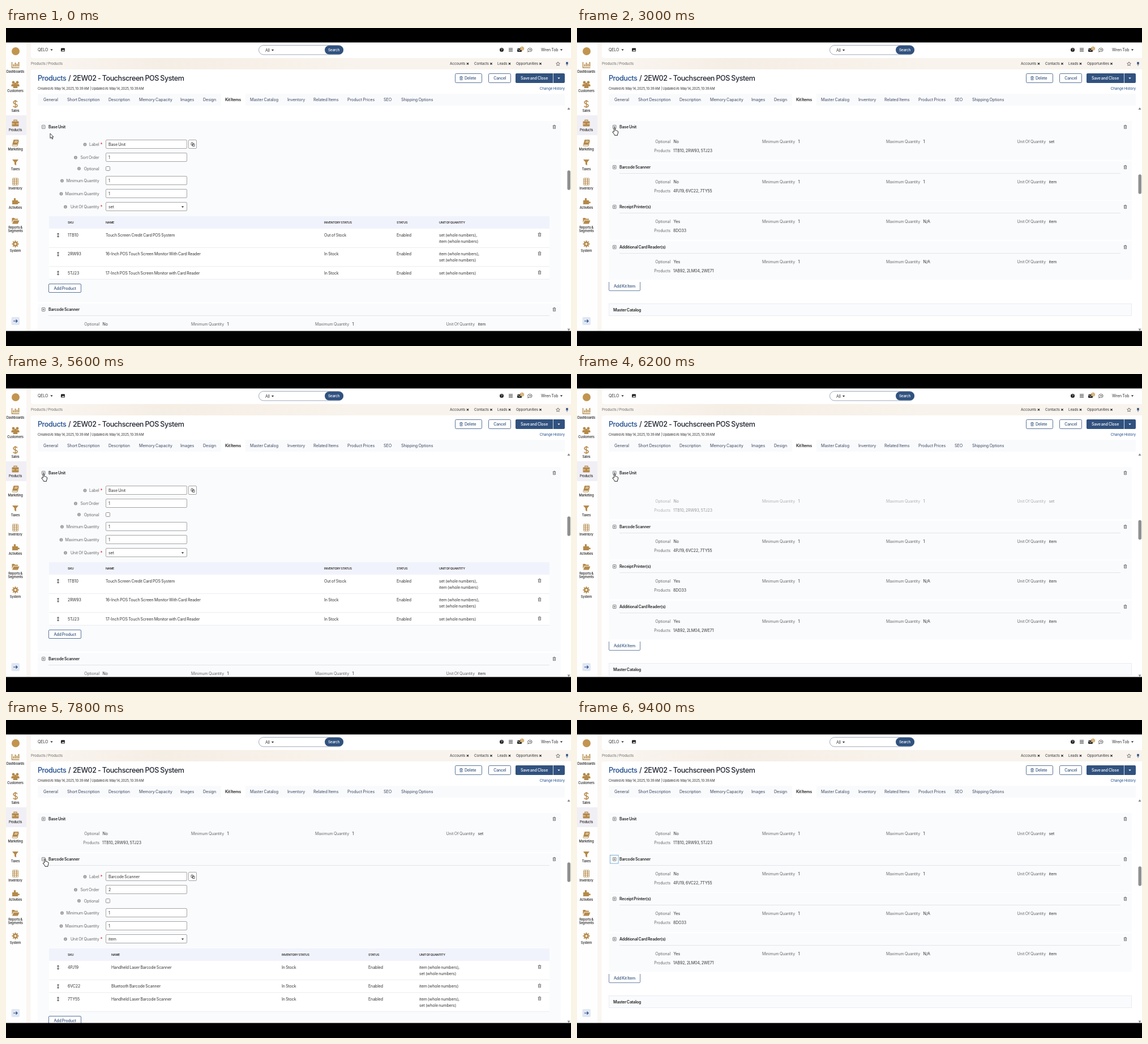
An HTML page for the animation above (9800 ms loop, 998x561 px).

```html
<!DOCTYPE html>
<html lang="en">
<head>
<meta charset="utf-8">
<title>Product kit items</title>
<style>
html, body { margin: 0; width: 100%; height: 100%; overflow: hidden; background: #000; }
svg { display: block; width: 100vw; height: 100vh; }
text { font: 400 7px Inter, sans-serif; letter-spacing: -.1px; word-spacing: -.5px; fill: #333; white-space: pre; }
.end { text-anchor: end; }
.mid { text-anchor: middle; }
.dim { fill: #6a6a6a; }
.bold { font-weight: 600; letter-spacing: -.18px; fill: #222; }
.title { font-size: 12.6px; font-weight: 500; letter-spacing: -.46px; fill: #1f2430; }
.tab { font-size: 7.2px; letter-spacing: -.08px; fill: #3c4660; }
.on { font-weight: 600; letter-spacing: -.25px; fill: #222; }
.small { font-size: 6.3px; }
.tiny { font-size: 5.9px; letter-spacing: -.18px; }
.link { fill: #1d4b8c; }
.side { font-size: 5.8px; font-weight: 500; letter-spacing: -.2px; text-anchor: middle; fill: #222; }
.th { font-size: 5.4px; font-weight: 600; letter-spacing: -.3px; fill: #333; }
.btn { font-weight: 500; letter-spacing: -.18px; fill: #34527d; }
.white { fill: #fff; }
.red { fill: #d22; font-size: 8px; }
</style>
</head>
<body>
<svg id="stage" viewBox="0 0 998 561" preserveAspectRatio="none"></svg>
<script>
const LOOP = 9800, STEP = 200;
const FORM_H = 300.8, SUMMARY_H = 49.7, HEAD_H = 21;
const NAVY = '#31527f', GOLD = '#b58a4a';

const text = (x, y, s, cls = '') => `<text x="${x}" y="${y}" dy=".36em" class="${cls}">${s}</text>`;
const rect = (x, y, w, h, fill, stroke = 'none', r = 0) =>
  `<rect x="${x}" y="${y}" width="${w}" height="${h}" rx="${r}" fill="${fill}" stroke="${stroke}" stroke-width=".8"/>`;
const path = (d, stroke = 'none', fill = 'none', w = .8) =>
  `<path d="${d}" stroke="${stroke}" fill="${fill}" stroke-width="${w}"/>`;
const dot = (x, y, r, fill) => `<circle cx="${x}" cy="${y}" r="${r}" fill="${fill}"/>`;
const caret = (x, y, c = '#222') => path(`M${x - 2.2} ${y - 1}h4.4l-2.2 2.4z`, 'none', c);
const cross = (x, y) => path(`M${x - 1.7} ${y - 1.7}l3.4 3.4m0-3.4l-3.4 3.4`, '#222', 'none', 1.1);
const trash = (x, y, c = '#555') =>
  path(`M${x - 2.8} ${y - 2}h5.6M${x - 1} ${y - 2.2}v-1h2v1M${x - 2} ${y - 2}v5h4v-5M${x - .6} ${y - .6}v2.4M${x + .6} ${y - .6}v2.4`, c, 'none', .7);
const at = (x, y, body) => `<g transform="translate(${x} ${y})">${body}</g>`;

function sidebar() {
  const icons = {
    Dashboards: [65, path('M-6-5v10h13', GOLD, 'none', 1.4) + path('M-3 3v-4M0 3v-7M3 3v-5M6 3v-8', GOLD, 'none', 1.8)],
    Customers: [99, dot(-3.5, -3, 2.4, GOLD) + dot(3.5, -3, 2.4, GOLD) + path('M-7 4v-3q3-3 6 0h2q3-3 6 0v3z', 'none', GOLD) + dot(0, 0, 2.4, GOLD) + path('M-4 7q0-5 4-5t4 5z', 'none', GOLD)],
    Sales: [134, path('M3.5-3.5q-1-2-3.5-2t-3.5 2.5q0 2 3.5 3t3.5 3q0 2.5-3.5 2.5t-3.5-2M0-7v14', GOLD, 'none', 1.5)],
    Products: [168, rect(-6, -3.5, 12, 9, GOLD, 'none', 1) + path('M-2.5-3.5v-2h5v2', GOLD, 'none', 1.3) + path('M-6 1h4.5M1.5 1h4.5', '#f1eff6', 'none', .9)],
    Marketing: [202, path('M-3-5h9l-2.5 9h-9z', 'none', GOLD) + path('M-5.5 4.5q-.5 1.5 1 1.5h8l2.5-9', GOLD, 'none', 1) + path('M-1-2.5h5M-1.6-.5h5', '#fff', 'none', .8)],
    Taxes: [237, path('M-5.5-5h11l-4 5v5.5l-3-2v-3.5z', 'none', GOLD)],
    Inventory: [271, rect(-5, -6, 10, 12, 'none', GOLD, .5) + path('M-5-3h10M-5 0h10M-5 3h10M-2-6v12M2-6v12', GOLD, 'none', 1.1)],
    Activities: [305, path('M-5.5-1h3q-1-4 1.5-4t1.5 4h4v2.5q3-1 3 1.2t-3 1.2v2h-10z', 'none', GOLD)],
    'Reports &amp;': [340, path('M-6-5h4l1.5 1.5h5v2h-8l-2.5 5z', 'none', GOLD) + path('M-3-.5h10l-2.5 6h-10z', 'none', GOLD)],
    System: [381, dot(0, 0, 4, GOLD) + path('M0-6v12M-6 0h12M-4.2-4.2l8.4 8.4M4.2-4.2l-8.4 8.4', GOLD, 'none', 2) + dot(0, 0, 1.8, '#fff')]
  };
  let out = rect(0, 25, 36, 509, '#fefefe') + rect(0, 154, 36, 35, '#f1eff6') + dot(17, 41, 7, '#c1954f');
  for (const [name, [y, shape]] of Object.entries(icons))
    out += at(16.5, y, shape) + text(16.5, y + 11.5, name, 'side');
  return out + text(16.5, 358, 'Segments', 'side') + rect(9.5, 510, 14.5, 14, '#e0e7f3', 'none', 2) +
    path('M13 517h7M17.5 514.5l2.5 2.5-2.5 2.5', '#214a86', 'none', 1.2);
}

function header() {
  let out = rect(36, 25, 962, 509, 'url(#sand)') + path('M44 25H998V53H48q-4 0-4-4z', 'none', '#fff') +
    path('M43.5 534V78q0-5 5-5H998V534z', 'none', '#fff') +
    text(56, 38.5, 'QELO') + caret(80.5, 38.5) +
    rect(97, 35.5, 7, 6, '#222', 'none', 1) + path('M98 40.5l2-2 1.3 1 1-1.4 1 2.4z', 'none', '#fff') +
    rect(446.5, 30.5, 149, 16.5, '#fff', '#8794a8', 8.3) + text(458, 39, 'All') + caret(471, 39) +
    rect(563, 31, 33, 15.5, NAVY, 'none', 7.8) + text(579, 38.7, 'Search', 'btn white mid small');
  out += dot(875.5, 38.5, 3.5, '#222') + text(875.5, 38.7, '?', 'mid tiny white') +
    path('M888 36h7M888 38.5h7M888 41h7', '#222', 'none', 1.1) +
    rect(903, 36, 8, 6, '#222', 'none', 1) + path('M903 37l4 2.5 4-2.5', '#fff') + dot(911.5, 36, 3.6, '#c79a51') +
    text(911.5, 36, '12', 'mid tiny white') +
    path('M925.5 35.5q3.7 0 3.7 3t-3.7 3q-1 0-1.8-.3l-2 1 .7-1.7q-.8-.9-.8-2 0-3 3.9-3z', '#333') +
    path('M924 38.5h3.5', '#333', 'none', 1) + text(945, 38.5, 'Wren Tob') + caret(981, 38.5) +
    text(44, 63, 'Products / Products', 'small dim');
  for (const [name, x, end] of [['Accounts', 784, 815.5], ['Contacts', 827, 857], ['Leads', 868, 889.5], ['Opportunities', 901, 944]])
    out += text(x, 63, name, 'small') + cross(end, 63);
  out += path('M975 59.8l1 2.2 2.4.3-1.8 1.7.5 2.4-2.1-1.2-2.1 1.2.5-2.4-1.8-1.7 2.4-.3z', '#444', 'none', .7) +
    path('M989 60h4l-.7 2.5 1.2 1.5h-5l1.2-1.5z', 'none', '#31527f') + path('M991 64v3', NAVY);
  out += text(56, 88, 'Products', 'title link') + text(110, 88, '/', 'title dim') +
    text(118, 88, '2EW02 - Touchscreen POS System', 'title') +
    text(56, 106.5, 'Created At: May 14, 2025, 10:39 AM  | Updated At: May 14, 2025, 10:39 AM', 'tiny') +
    text(987, 106.5, 'Change History', 'small link end');
  out += rect(793.5, 80.5, 47, 16, '#fff', NAVY, 2) + trash(804, 88.5, NAVY) + text(810, 88.5, 'Delete', 'btn') +
    rect(852.5, 80.5, 39, 16, '#fff', NAVY, 2) + text(872.3, 88.5, 'Cancel', 'btn mid') +
    rect(900, 80, 87, 17, NAVY, 'none', 2) + path('M966.5 80v17', '#fff') +
    text(933, 88.5, 'Save and Close', 'btn white mid') + caret(976.5, 88.5, '#fff');
  const tabs = [['General', 66], ['Short Description', 108], ['Description', 181], ['Memory Capacity', 235], ['Images', 308],
    ['Design', 348], ['Kit Items', 387], ['Master Catalog', 431], ['Inventory', 497], ['Related Items', 543],
    ['Product Prices', 603], ['SEO', 667], ['Shipping Options', 698]];
  out += rect(56, 116, 931, 21, '#f9fafc') + rect(380, 116, 43, 21, '#fff');
  for (const [name, x] of tabs) out += text(x, 126.5, name, name === 'Kit Items' ? 'tab on' : 'tab');
  return out + path('M991.5 144l2.5-4 2.5 4z', 'none', '#888') + path('M991.5 530.5l2.5 4 2.5-4z', 'none', '#888');
}

const inputBox = (x, y, w) => rect(x, y - 8, w, 15, '#fff', '#919191', 1.5);
const field = (y, label, icon, value, required) =>
  dot(icon, y, 2.9, '#999') + path(`M${icon} ${y - .5}v2.2M${icon} ${y - 1.8}v.8`, '#fff') +
  text(164.5, y, label, 'end dim') + (required ? text(166.5, y, '*', 'red') : '') +
  (value === undefined ? rect(176.5, y - 3.5, 7, 7, '#fff', '#777', 1)
    : inputBox(176.5, y, 143) + text(181, y, value));

function form(item) {
  const [sku, name, stock, status, unit] = item.cols;
  let out = field(41.5, 'Label', 139.5, item.name, true) + inputBox(322.5, 41.5, 14) +
    path('M327 38.5h3.5v4h-3.5zM329.5 40.5h3.5v4h-3.5z', '#333') +
    field(64.5, 'Sort Order', 123, item.order) + field(84, 'Optional', 129) +
    field(105.5, 'Minimum Quantity', 99, 1) + field(128.5, 'Maximum Quantity', 97.5, 1) +
    field(151.5, 'Unit Of Quantity', 105, item.unit, true) + caret(312, 151.5) +
    rect(76, 168, 884, 111, '#fff') + rect(76, 168, 884, 22, '#f1f3fc');
  item.cols.forEach((x, i) => out += text(x, 179, ['SKU', 'NAME', 'INVENTORY STATUS', 'STATUS', 'UNIT OF QUANTITY'][i], 'th'));
  let y = 190;
  for (const [code, label, avail, ...units] of item.rows) {
    const c = y + 11.5;
    out += path(`M92 ${c - 3}v6M90.5 ${c - 1.8}l1.5-1.8 1.5 1.8M90.5 ${c + 1.8}l1.5 1.8 1.5-1.8`, '#222', 'none', .9) +
      text(sku, c, code) + text(name, c, label) + text(stock, c, avail) + text(status, c, 'Enabled') + trash(942.5, c - 1);
    units.forEach((u, i) => out += text(unit, c + i * 11, u + ' (whole numbers)' + (i < units.length - 1 ? ',' : '')));
    y += units.length > 1 ? 33.4 : 22.4;
    out += path(`M76 ${y}H960`, '#e6e8ee');
  }
  return out + rect(75.5, 287.5, 57, 15, '#fff', NAVY, 1.5) + text(104.2, 295, 'Add Product', 'btn mid');
}

function summary(item) {
  const cells = [['Optional', item.optional, 165], ['Minimum Quantity', 1, 385], ['Maximum Quantity', item.max, 606], ['Unit Of Quantity', item.unit, 828]];
  return cells.map(([label, value, x]) => text(x, 36.5, label, 'end dim') + text(x + 5.5, 36.5, value)).join('') +
    text(165, 52, 'Products', 'end dim') + text(170, 52, item.products);
}

const items = [
  { name: 'Base Unit', order: 1, optional: 'No', max: 1, unit: 'set', products: '1TB10, 2RW93, 5TJ23',
    cols: [109, 176, 562, 690, 765],
    rows: [['1TB10', 'Touch Screen Credit Card POS System', 'Out of Stock', 'set', 'item'],
      ['2RW93', '16-Inch POS Touch Screen Monitor With Card Reader', 'In Stock', 'item', 'set'],
      ['5TJ23', '17-Inch POS Touch Screen Monitor with Card Reader', 'In Stock', 'set']],
    moves: [[-2000, true], [2000, false], [3600, true], [5400, false]],
    focus: t => t >= 3200 && t < 4000 || t >= 6600 && t < 7400 },
  { name: 'Barcode Scanner', order: 2, optional: 'No', max: 1, unit: 'item', products: '4PJ19, 6VC22, 7TY55',
    cols: [109, 186, 487, 640, 730],
    rows: [['4PJ19', 'Handheld Laser Barcode Scanner', 'In Stock', 'item', 'set'],
      ['6VC22', 'Bluetooth Barcode Scanner', 'In Stock', 'item'],
      ['7TY55', 'Handheld Laser Barcode Scanner', 'In Stock', 'item', 'set']],
    moves: [[-2000, false], [7000, true], [7800, false]],
    focus: t => t >= 9000 },
  { name: 'Receipt Printer(s)', optional: 'Yes', max: 'N/A', unit: 'item', products: '8DO33' },
  { name: 'Additional Card Reader(s)', optional: 'Yes', max: 'N/A', unit: 'item', products: '1AB92, 2LM04, 2WE71' }
];

const section = (item, i) => `<g id="item${i}">` +
  rect(56, 0, 924, 68.5, '#fafbfd').replace('<rect', '<rect class="panel"') +
  (i ? path('M75 21.5H960', '#dcdfe6') : '') +
  rect(58.5, 3.5, 14.5, 14.5, '#fff', '#5d9fcf').replace('<rect', '<rect class="focus" visibility="hidden"') +
  rect(63.5, 7.5, 5.5, 6, '#fff', '#666', .5) + path('M64.7 10.5h3', '#555') +
  `<g class="plus">${path('M66.2 9v3', '#555')}</g>` +
  text(75, 10.5, item.name, 'bold') + trash(968.5, 10.5) +
  (item.rows ? `<g class="form">${form(item)}</g>` : '') + `<g class="summary">${summary(item)}</g></g>`;

const stage = document.getElementById('stage');
stage.innerHTML = `<defs><linearGradient id="sand"><stop stop-color="#faf6f1"/><stop offset=".25" stop-color="#f5eee5"/>
  <stop offset=".6" stop-color="#f8f3ec"/><stop offset="1" stop-color="#f8f3ed"/></linearGradient></defs>` +
  rect(0, 0, 998, 561, '#fff') + header() + sidebar() + items.map(section).join('') +
  `<g id="footer">${path('M56.5 1v14q0 1.5 1.5 1.5h52q1.5 0 1.5-1.5V1', NAVY, 'none', .7) + text(84, 8.5, 'Add Kit Item', 'btn mid') +
    rect(56.5, 39.5, 923, 21, '#fafbfd', '#e6e8ee') + text(64, 50.2, 'Master Catalog', 'tab on')}</g>` +
  `<g id="thumb">${rect(991.5, 0, 5.5, 34.5, '#8f8f8f', 'none', 2.7)}</g>` +
  `<g id="arrow">${path('M0 0v8.5l2-1.8 1.5 3.3 1.4-.6-1.5-3.2h2.6z', '#111', '#fff')}</g>` +
  `<g id="hand">${path('M-1.5 1v-6q0-1 1-1t1 1v3.5q1.5-.5 2 .5 1.3-.3 1.7.6 1.3 0 1.3 1.3v2.1l-1 3v1.3h-5l-.5-1.4-3-4q-.3-1.3 1-1z', '#111', '#fff', .9)}</g>` +
  rect(0, 0, 998, 25.5, '#000') + rect(0, 534.5, 998, 27, '#000');

const $ = s => stage.querySelector(s);
const move = (el, x, y) => el.setAttribute('transform', `translate(${x} ${y})`);
const show = (el, on) => el.setAttribute('visibility', on ? 'visible' : 'hidden');

// Each list is sampled once per STEP after a toggle.
const shapes = {
  open: { inH: [0, .06, .65, 1], inO: [0, 0, 0, .5, 1], outH: [1, 1, .5, 0], outO: [1, .4, 0] },
  close: { inH: [0, .12, .6, 1], inO: [0, 0, 0, 0, .5, 1], outH: [1, 1, 1, .7, .08, 0], outO: [1, 1, .5, 0] }
};

function panelState(item, t) {
  if (!item.moves) return { formH: 0, formO: 0, sumH: 1, sumO: 1, plus: true };
  const [start, opening] = item.moves.filter(m => m[0] <= t).pop();
  const n = (t - start) / STEP, s = opening ? shapes.open : shapes.close;
  const v = key => s[key][Math.min(n, s[key].length - 1)];
  const plus = n > 0 ? !opening : opening;
  return opening ? { formH: v('inH'), formO: v('inO'), sumH: v('outH'), sumO: v('outO'), plus }
    : { formH: v('outH'), formO: v('outO'), sumH: v('inH'), sumO: v('inO'), plus };
}

function draw(t) {
  let y = 164;
  items.forEach((item, i) => {
    const s = panelState(item, t), g = $('#item' + i), formH = FORM_H * s.formH;
    const h = HEAD_H + formH + SUMMARY_H * s.sumH;
    move(g, 0, Math.round(y));
    g.querySelector('.panel').setAttribute('height', h - 2.3);
    if (item.rows) {
      g.querySelector('.form').setAttribute('opacity', s.formO);
      show(g.querySelector('.focus'), item.focus(t));
    }
    const sum = g.querySelector('.summary');
    sum.setAttribute('opacity', s.sumO);
    move(sum, 0, Math.round(formH));
    show(g.querySelector('.plus'), s.plus);
    y += h;
  });
  move($('#footer'), 0, Math.round(y));
  move($('#thumb'), 0, 258.3 - 7 * Math.min(1, (y - 447) / 251));

  const pointing = t >= 1400;
  show($('#arrow'), !pointing);
  show($('#hand'), pointing && t < 9000);
  const [ax, ay] = t < 200 ? [78, 186] : t < 400 ? [74, 184] : t < 1000 ? [70, 183] : [66, 178];
  move($('#arrow'), ax, ay);
  if (t < 6800) move($('#hand'), 67, 182);
  else move($('#hand'), 69.5, t < 7000 ? 216 : 251);
}

const begin = performance.now();
let last = -1;
function tick() {
  const t = Math.floor(((performance.now() - begin) % LOOP) / STEP) * STEP;
  if (t !== last) draw(last = t);
  requestAnimationFrame(tick);
}
tick();
</script>
</body>
</html>
```
